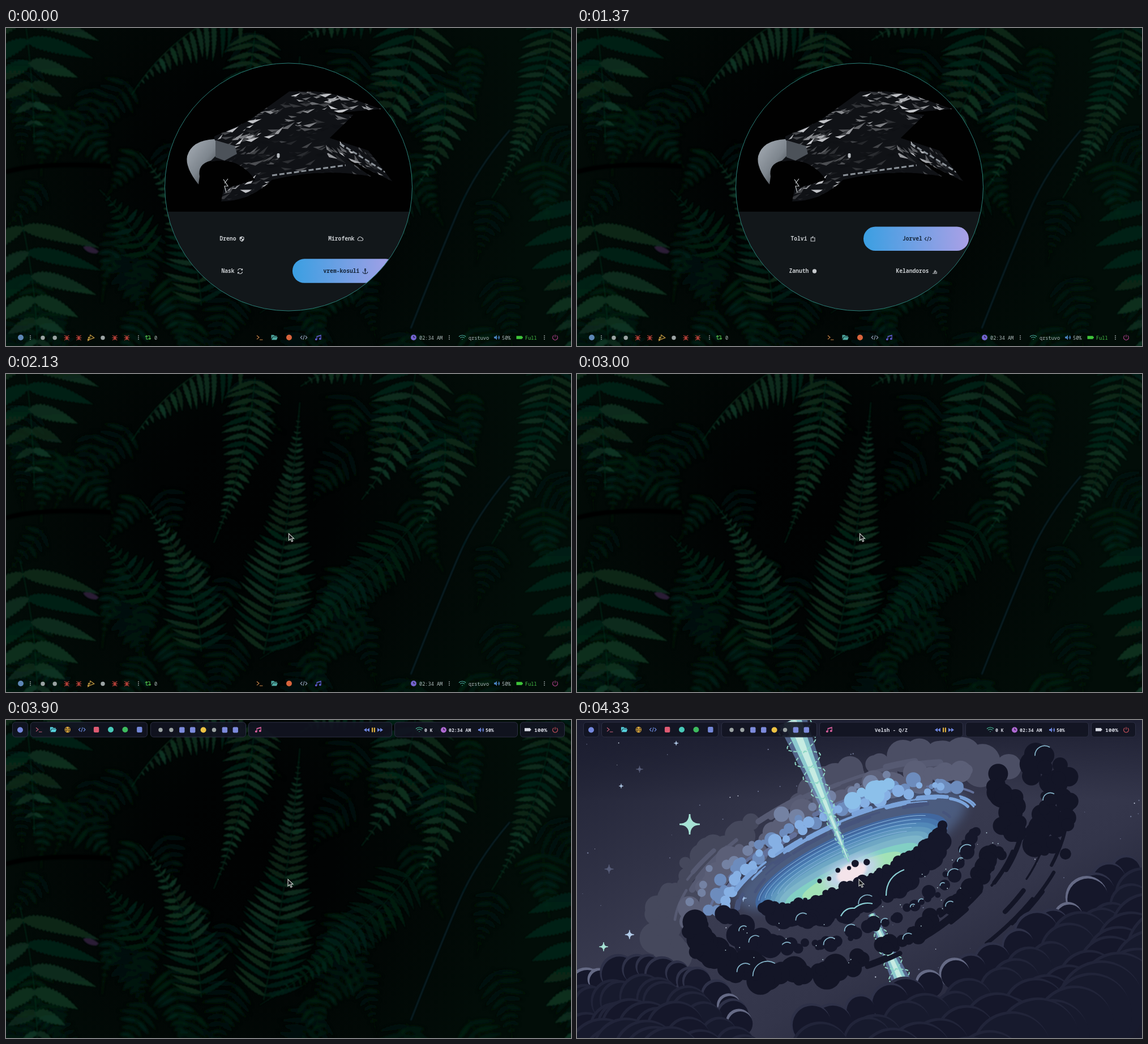
These frames come from a looping animation (998 by 561 pixels, 4730 ms). An HTML page:

```html
<!DOCTYPE html>
<html lang="en">
<head>
<meta charset="utf-8">
<title>Desktop themes</title>
<style>
html,body{margin:0;width:100%;height:100%;overflow:hidden;background:#010504}
svg{display:block;width:998px;height:561px}
text{font-family:"Noto Sans Mono",monospace;white-space:pre}
</style>
</head>
<body>
<svg id="stage" viewBox="0 0 998 561" xmlns="http://www.w3.org/2000/svg"></svg>
<script>
const LOOP = 4730, stage = document.getElementById('stage');
let seed = 7, defs = '', ids = 0;
const rnd = () => (seed = (seed * 16807) % 2147483647) / 2147483647;
const vary = k => (rnd() - .5) * k;
const f = v => v.toFixed(1);
const pts = a => a.map(p => f(p[0]) + ' ' + f(p[1])).join('L');
const loop = (n, fn) => Array.from({length: n}, (_, i) => fn(i));
const many = (n, fn) => loop(n, fn).join('');
const path = (d, fill, extra = '') => `<path d="${d}" fill="${fill}" ${extra}/>`;
const line = (d, c, w = 1, extra = '') => path(d, 'none', `stroke="${c}" stroke-width="${w}" ${extra}`);
const dot = (x, y, r, c) => `<circle cx="${f(x)}" cy="${f(y)}" r="${f(r)}" fill="${c}"/>`;
const box = (x, y, w, h, c, r = 0, extra = '') => `<rect x="${x}" y="${y}" width="${w}" height="${h}" rx="${r}" fill="${c}" ${extra}/>`;
const text = (x, y, s, c, size, extra = '') => `<text x="${x}" y="${y}" fill="${c}" font-size="${size}" ${extra}>${s}</text>`;
const group = (s, attr = '') => `<g ${attr}>${s}</g>`;
// point and heading on a quadratic curve
function curve(x0, y0, cx, cy, x1, y1, u) {
  const v = 1 - u;
  return [v * v * x0 + 2 * u * v * cx + u * u * x1, v * v * y0 + 2 * u * v * cy + u * u * y1,
    Math.atan2(v * (cy - y0) + u * (y1 - cy), v * (cx - x0) + u * (x1 - cx))];
}

// --- icons: [path, filled]
const ICONS = {
  term: ['M-5-3.5l4 3.3-4 3.3M0 4h5.5'],
  folder: ['M-5.5-4.5h4.5l1.5 1.5H4.5v1.5H-3L-5.5 3zM-2.5-.8H6L4 4.3H-5z', 1],
  code: ['M-2.8-3l-3 3 3 3M2.8-3l3 3-3 3M1-4L-1 4'],
  music: ['M-3.5 1.8a2 1.7 0 1 0 1.3 1.6V-1L3.6-2.6V.8a2 1.7 0 1 0 1.2 1.6V-5L-3.5-2.6z', 1],
  wifi: ['M-6-1.5a8.5 8.5 0 0 1 12 0M-3.8.8a5.3 5.3 0 0 1 7.6 0M-.6 3.4h1.2'],
  volume: ['M-5-1.6h2.2L0-4.2v8.4L-2.8 1.6H-5zM1.4-1.8a2.4 2.4 0 0 1 0 3.6zM3-4a5 5 0 0 1 0 8z', 1],
  battery: ['M-5.5-2.8h10v1.6h1.4v2.4H4.5v1.6h-10z', 1],
  power: ['M-2.4-3.6a4.4 4.4 0 1 0 4.8 0M0-5v4.5'],
  bug: ['M0-4V4M-1.2-2V3M1.2-2V3M-4-4.4l2.5 2.4M4-4.4L1.5-2M-4.8 0H4.8M-4 4.4L-1.5 2M4 4.4L1.5 2'],
  swap: ['M-5-1l2-2.4 2 2.4M-3-3.2V3H1M5 1L3 3.4 1 1M3 3.2V-3H-1'],
  bell: ['M-5 5l1-6 2 2L-1-5 6 0-2 3zM-6 3h3'],
  globe: ['M-4.6 0a4.6 4.6 0 1 0 9.2 0a4.6 4.6 0 1 0-9.2 0H4.6M0-4.6V4.6M0-4.6q-4.4 4.6 0 9.2q4.4-4.6 0-9.2'],
  shield: ['M0-4.5L4-3V0Q4 3 0 5Q-4 3-4 0V-3zM0-3.2V0H-2.8Q-2.5 2.4 0 3.6V0H2.8V-2.2z', 1],
  cloud: ['M-3 3a2.2 2.2 0 0 1-.4-4.2 3 3 0 0 1 5.6-.7A2.5 2.5 0 0 1 3 3z'],
  refresh: ['M-4-1a4 4 0 0 1 7.5-1.4M4-4.5v2.4H1.6M4 1A4 4 0 0 1-3.5 2.4M-4 4.5V2.1h2.4'],
  anchor: ['M0-2.4V4.4M-2-1H2M-4.4 1Q-4 4.4 0 4.4Q4 4.4 4.4 1M-1-3.4a1 1 0 1 0 2 0a1 1 0 1 0-2 0'],
  bag: ['M-3.4-2H3.4V4H-3.4zM-1.2-2q0-2.4 2.6-2'],
  stack: ['M-3.6 4H3.6V.5M-1.6 2.2H1.8M-1 .4L2 .9M.2-1.6L2.6.2'],
  prev: ['M0-3.5V3.5L-5 0zM5-3.5V3.5L0 0z', 1],
  next: ['M0-3.5V3.5L5 0zM-5-3.5V3.5L0 0z', 1],
  pause: ['M-3-4h2.2v8H-3zM.8-4H3v8H.8z', 1]
};
function icon(name, x, y, c) {
  if (name === 'disc') return dot(x, y, 5, c);
  if (name === 'dot') return dot(x, y, 3.7, c);
  if (name === 'square') return box(x - 4.7, y - 5, 9.4, 10, c, 2);
  if (name === 'clock') return dot(x, y, 5, c) + line(`M${x} ${y - 3}v3h2.4`, '#11131c');
  if (name === 'more') return [-3, 0, 3].map(d => dot(x, y + d, .9, c)).join('');
  const [d, solid] = ICONS[name], at = `transform="translate(${f(x)} ${y})"`;
  return solid ? path(d, c, at + ' fill-rule="evenodd"') : line(d, c, 1.1, at);
}
// evenly spaced icons written as "name colour"
const row = (x, step, y, list) => list.map((s, i) => icon(s.split(' ')[0], x + i * step, y, s.split(' ')[1])).join('');

// --- fern wallpaper
const GREENS = ['#03110a', '#051a0f', '#072517', '#0c3524', '#164c3c'];
function leaf(x, y, a, len, h, side) {
  const m = Math.max(3, Math.round(len / 7)), up = [], low = [];
  const ca = Math.cos(a), sa = Math.sin(a);
  for (let j = 0; j <= 2 * m; j++) {
    const s = j / (2 * m), w = h * 2.5 * Math.sqrt(s) * (1 - s) * (j % 2 ? 1 : .75), lean = -side * .13 * len * s * s;
    const at = n => [x + ca * len * s - sa * n, y + sa * len * s + ca * n];
    up.push(at(lean + w));
    low.unshift(at(lean - w));
  }
  return 'M' + pts(up.concat(low)) + 'z';
}
// base, tip, sideways bend, leaf length, tone, gap between leaves
function fern(x0, y0, x1, y1, bend, w, tone, gap = 13, sides = [-1, 1]) {
  const len = Math.hypot(x1 - x0, y1 - y0), n = Math.round(len / gap), id = 'fern' + ids++;
  const spine = [x0, y0, (x0 + x1) / 2 - (y1 - y0) / len * bend, (y0 + y1) / 2 + (x1 - x0) / len * bend, x1, y1];
  const d = ['', ''];
  defs += `<linearGradient id="${id}" gradientUnits="userSpaceOnUse" x1="${f(x0)}" y1="${f(y0)}" x2="${f(x1)}" y2="${f(y1)}"><stop stop-color="${GREENS[tone - 1]}"/><stop offset="1" stop-color="${GREENS[tone]}"/></linearGradient>`;
  for (let i = 0; i < n; i++) {
    const v = (1 - (i + .5) / n) ** 1.25, [x, y, th] = curve(...spine, 1 - v);
    const size = w * Math.min(1, 1.35 * v ** 1.2) * (.88 + .24 * rnd());
    for (const s of sides) d[rnd() < .5 ? 0 : 1] += leaf(x, y, th + s * (1.28 + vary(.16)), size, Math.min(gap * .42, size * .22), s);
  }
  return path(d[0], `url(#${id})`) + path(d[1], `url(#${id})`, 'opacity=".72"')
    + line(`M${f(x0)} ${f(y0)}Q${spine.slice(2).map(f).join(' ')}`, GREENS[tone], 1.4, 'opacity=".8"');
}
function ferns() {
  const filler = many(70, i => {
    const x = rnd() * 998, y = rnd() * 580, a = Math.PI * (.25 + rnd() * .5), len = 90 + rnd() * 70;
    return Math.hypot(x - 430, y - 200) < 150 ? '' : fern(x, y, x + len * Math.cos(a), y + len * Math.sin(a), vary(50), 30 + rnd() * 25, i % 3 ? 1 : 2);
  });
  const front = fern(30, -40, 50, 200, -8, 135, 3, 36) + fern(25, 330, 55, 620, -20, 150, 3, 36)
    + fern(1015, 290, 1005, 620, 10, 105, 3, 36)
    + fern(420, -40, 222, 118, 45, 75, 3, 13, [-1])
    + fern(250, 405, 165, 285, 14, 50, 2) + fern(715, 270, 448, 503, -30, 55, 2)
    + fern(345, 490, 236, 220, 50, 60, 3) + fern(440, 5, 367, 298, -24, 52, 3)
    + fern(725, -20, 628, 222, -40, 82, 3, 18) + fern(775, 105, 725, 280, -35, 58, 3, 16)
    + fern(968, -20, 858, 300, -40, 56, 3) + fern(650, -45, 520, 22, 8, 55, 3)
    + fern(455, 494, 519, 50, 15, 76, 3)
    + line('M890 180Q830 250 800 320T715 530', '#12405a', 2.4, 'opacity=".45"')
    + line('M0 254Q60 236 185 244', '#010302', 8) + path('M136 386q14-4 28 8l-4 4q-18 0-24-12', '#291f36');
  defs += '<radialGradient id="floor" gradientUnits="userSpaceOnUse" cx="420" cy="240" r="520"><stop stop-color="#010202"/><stop offset=".3" stop-color="#010303"/><stop offset="1" stop-color="#020d08"/></radialGradient>'
    + [['fine', .8], ['soft', 2], ['haze', 9]].map(([id, k]) => `<filter id="${id}"><feGaussianBlur stdDeviation="${k}"/></filter>`).join('');
  return box(0, 0, 998, 561, 'url(#floor)') + group(filler, 'filter="url(#soft)"') + group(front, 'filter="url(#fine)"');
}

// --- galaxy wallpaper, built around one tilted centre
const DARK = '#15172a', DEEP = '#131526';
const orbit = (rx, ry, deg) => {
  const a = deg * Math.PI / 180, x = rx * Math.cos(a), y = ry * Math.sin(a);
  return [485 + x * .914 + y * .407, 255 - x * .407 + y * .914];
};
const sweep = (rx, ry, a0, a1) => loop(41, i => orbit(rx, ry, a0 + (a1 - a0) * i / 40));
const streak = (rx, ry, a0, a1, c, w) => line('M' + pts(sweep(rx, ry, a0, a1)), c, w, 'stroke-linecap="round"');
const streaks = (n, rx, ry, a0, a1, c, w) => many(n, () => {
  const a = a0 + rnd() * (a1 - a0), k = .92 + rnd() * .16;
  return streak(rx * k, ry * k, a, a + 6 + rnd() * 14, c, w * (.5 + rnd()));
});
function puffs(rx, ry, a0, a1, n, r, c, spread = 10, rim = 0) {
  let s = '', rims = '';
  for (let i = 0; i < n; i++) {
    const [px, py] = orbit(rx, ry, a0 + (a1 - a0) * (i + rnd() * .8) / n);
    const x = px + vary(spread), y = py + vary(spread), q = r * (.4 + rnd() * .8);
    s += dot(x, y, q, c);
    if (rnd() < rim) rims += line(`M${f(x - q)} ${f(y)}a${f(q)} ${f(q)} 0 0 1 ${f(q * 1.5)} ${f(-q * .86)}`, '#86b6cb', 1.7, 'stroke-linecap="round"');
  }
  return s + rims;
}
const disc = (dy, rx, ry, c, extra = '') => `<ellipse rx="${rx}" ry="${ry}" fill="${c}" transform="translate(485 ${255 + dy}) rotate(-24)" ${extra}/>`;
const spark = (x, y, r, c) => path(`M${f(x)} ${f(y - r)}q0 ${r} ${r} ${r}q${-r} 0 ${-r} ${r}q0 ${-r} ${-r} ${-r}q${r} 0 ${r} ${-r}`, c, `stroke="${c}" stroke-width="${r / 7}"`);
function jet(x0, y0, x1, y1, w0, w1, turns) {
  const len = Math.hypot(x1 - x0, y1 - y0), nx = -(y1 - y0) / len, ny = (x1 - x0) / len;
  const at = (u, k) => { const w = (w0 + (w1 - w0) * u) * k; return [x0 + (x1 - x0) * u + nx * w, y0 + (y1 - y0) * u + ny * w]; };
  const beam = (k, c) => path('M' + pts([at(0, -k), at(1, -k), at(1, k), at(0, k)]) + 'z', c);
  const coil = sign => line('M' + pts(loop(91, i => at(i / 90, sign * Math.sin(i / 90 * turns * Math.PI)))), '#8fd8c6', 2, 'stroke-dasharray="6 3"');
  return beam(.8, '#7d9fd488') + beam(.5, '#8cc9cf') + beam(.22, '#c6ebe2') + coil(1) + coil(-1);
}
// a bank of clouds: each layer lies further in, with a fainter rim
function bank(x0, y0, cx, cy, x1, y1, n, r, dx, dy) {
  return many(4, k => many(n, i => {
    const [px, py] = curve(x0, y0, cx, cy, x1, y1, (i + rnd() * .7) / n);
    const x = px + dx * k + vary(14), y = py + dy * k + vary(14), q = r * (.7 + rnd() * .5 + k * .4);
    const rim = k ? '#212439' : rnd() < .45 ? '#656a85' : '#2e3148';
    return dot(x, y, q, rim) + dot(x + 2.5, y + 3.5, q - 1, k % 2 ? '#171a2d' : DARK);
  }));
}
function galaxy() {
  defs += '<linearGradient id="sky" x2="1" y2="1"><stop stop-color="#1e2032"/><stop offset=".42" stop-color="#393b50"/><stop offset=".65" stop-color="#33354a"/><stop offset="1" stop-color="#16182a"/></linearGradient>'
    + '<linearGradient id="dusk" x2="0" y2="1"><stop stop-color="#1a1c2e" stop-opacity=".9"/><stop offset=".25" stop-color="#1a1c2e" stop-opacity="0"/></linearGradient>';
  let s = box(0, 0, 998, 561, 'url(#sky)') + box(0, 0, 998, 561, 'url(#dusk)');
  s += many(110, () => dot(rnd() * 998, 35 + rnd() * 500, .5 + rnd() * .8, rnd() < .7 ? '#69708d' : '#cfd8e8'));
  s += many(9, i => spark(rnd() * 320, 40 + rnd() * 500, 4 + i % 3 * 2, i % 2 ? '#565c78' : '#b3cdea'));
  s += spark(199, 184, 18, '#a6e3d5') + spark(356, 196, 11, '#b3cdea') + spark(47, 400, 8, '#a6e3d5');
  // far side
  s += puffs(360, 150, 170, 250, 40, 25, '#45485c', 34) + puffs(330, 140, 262, 340, 34, 28, '#4b4e64', 34)
    + streaks(14, 335, 145, 175, 330, '#565a72', 8)
    + puffs(300, 118, 195, 325, 46, 20, '#5b5f77', 28) + puffs(310, 125, 200, 300, 16, 12, '#7482a3', 26)
    + disc(-25, 220, 62, '#6f9bd8', 'filter="url(#haze)" opacity=".35"') + streaks(16, 265, 100, 190, 335, '#63719a', 6)
    + puffs(262, 104, 188, 335, 40, 11, '#6d8cbd', 22) + puffs(248, 94, 190, 325, 34, 10, '#86b0e4', 18)
    + puffs(268, 108, 282, 296, 9, 14, '#8cc0ea', 18) + streaks(18, 228, 78, 185, 345, '#7ba4db', 6)
    + streaks(16, 205, 68, 185, 350, '#46547c', 5);
  // glowing disc
  s += many(6, i => disc(i * 2, 184 - i * 9, 56 - i * 6, `hsl(${216 - i * 4} 42% ${44 + i * 4}%)`));
  s += many(5, i => streak(178 - i * 12, 52 - i * 6, 190, 330, '#8cb9e0', 1))
    + disc(18, 128, 23, '#82cfc4') + disc(19, 95, 17, '#a2e2b6')
    + disc(14, 52, 24, '#c5d2f0', 'filter="url(#haze)" opacity=".9"')
    + path('M482 256L440 150 410 90 455 190z', '#7fa8e0', 'filter="url(#haze)"') + jet(480, 250, 380, 0, 2, 32, 9)
    + disc(14, 28, 15, '#f4e4ea', 'filter="url(#soft)"');
  // near side
  s += path('M' + pts(sweep(178, 30, 0, 180).concat(sweep(174, 78, 180, 0))) + 'z', DARK)
    + puffs(176, 34, 2, 178, 60, 9, DARK, 8) + puffs(168, 76, 8, 172, 48, 15, DARK, 14, .06)
    + many(6, i => dot(430 + i * 16 + vary(6), 283 - i * 7 + vary(10), 3 + rnd() * 5, DARK))
    + line('M466 346q8-16 24-14q14-12 32-8M546 310q0-34 32-46', '#8bd0d5', 2.2)
    + jet(520, 342, 585, 488, 8, 23, 6)
    + puffs(228, 118, 15, 168, 50, 11, DARK, 16, .2) + puffs(235, 128, 148, 186, 16, 18, DARK, 24, .2)
    + puffs(300, 166, 100, 186, 42, 23, DEEP, 28, .05) + puffs(285, 156, 28, 92, 42, 15, DEEP, 24, .06) + puffs(300, 150, -10, 24, 20, 18, DEEP, 34, .06)
    + streaks(12, 300, 172, 20, 110, DEEP, 6) + streaks(7, 390, 230, 20, 50, DEEP, 6)
    + puffs(385, 215, -8, 36, 36, 19, DEEP, 56, .04)
    + many(30, () => dot(...orbit(170 + rnd() * 130, 75 + rnd() * 90, 15 + rnd() * 150), .9, '#b9d5de'));
  return s + bank(10, 465, 190, 385, 310, 560, 13, 27, -10, 50) + bank(970, 255, 790, 440, 380, 550, 17, 33, 34, 46);
}

// --- launcher
const ITEMS = ['Dreno shield', 'Mirofenk cloud', 'Nask refresh', 'vrem-kosuli anchor',
  'Tolvi bag', 'Jorvel code', 'Zanuth dot', 'Kelandoros stack'].map(s => s.split(' '));
function bird() {
  const beak = 'M340 276Q316 246 320 226Q328 198 368 196L380 216 362 234Q338 240 342 262z';
  const body = 'M362 236L368 191 428 164 500 112 548 112 598 120 663 143 580 150 614 153 572 194 640 216 683 271 600 230 645 262Q560 246 470 268Q430 306 380 306L384 284 440 268Q410 226 362 236z';
  defs += `<clipPath id="bird"><path d="${body}"/></clipPath><linearGradient id="beak" x2="1" y2="1"><stop stop-color="#a9b0b8"/><stop offset=".5" stop-color="#7d858d"/><stop offset="1" stop-color="#1d2024"/></linearGradient>`;
  // plates follow the head, bright along the crest and the feather edges
  const plates = many(480, () => {
    const x = 365 + rnd() * 315, y = 108 + rnd() * 195, wing = y > 190 && x > 560;
    const a = (wing ? .65 : -.45 + (x - 370) / 420) + vary(.8), len = 7 + rnd() * 22;
    const crest = y < 232 - (x - 340) * .32 || (y < 150 && x > 480);
    const v = Math.round(14 + 195 * rnd() ** (crest ? 1.2 : 2.6) * (crest || wing || y > 245 ? 1 : .4));
    const at = (k, da) => [x + len * k * Math.cos(a + da), y + len * k * Math.sin(a + da)];
    return path('M' + pts([[x, y], at(1, 0), at(.45, .5)]) + 'z', `rgb(${v},${v + 2},${v + 6})`);
  });
  return group(path(body, '#101216') + plates + line('M590 204l80 50M470 260l130-18', '#8b9299', 3, 'stroke-dasharray="9 4"'), 'clip-path="url(#bird)"')
    + path(beak, 'url(#beak)') + path('M370 198l34 10 4 14-22 12-16-6z', '#4c5259')
    + line('M384 267l8 12h-6l3 11M386 274l6-8', '#c5c9cc', 1.2) + box(478.5, 221, 5, 8, '#b9bdc2', 2);
}
function launcher() {
  defs += '<clipPath id="round"><circle cx="499" cy="280.5" r="218.5"/></clipPath><linearGradient id="glow"><stop stop-color="#3a9fe2"/><stop offset="1" stop-color="#aaa0e6"/></linearGradient>';
  const items = ITEMS.map(([name, ic], i) => {
    const w = name.length * 5.82, x = (i % 2 ? 600 : 399.5) - (w + 15) / 2, y = i % 4 < 2 ? 372 : 429;
    return group(text(f(x), y + 3.4, name, 'currentColor', 9.7, 'font-weight="600"') + icon(ic, x + w + 10, y, 'currentColor'), `id="item${i}"`);
  }).join('');
  return group(box(280, 60, 440, 264, '#010101') + box(280, 324, 440, 180, '#12171a') + bird()
    + box(0, 0, 186, 42.5, 'url(#glow)', 21, 'id="pill"') + items, 'clip-path="url(#round)"')
    + '<circle cx="499" cy="280.5" r="218.5" fill="none" stroke="#2b7f78"/>';
}

// --- panels
const label = (x, s, c = '#b0bcbc') => text(x, 549.5, s, c, 8.6);
const bold = (x, s, size = 8.2) => text(x, 20.5, s, '#d5d8e2', size, 'font-weight="700"');
const one = (x, s, y = 546) => row(x, 0, y, [s]);
const GREY = 'dot #9ba3a3', BUG = 'bug #c2443c', GHOST = 'square #7d8bdc', MORE = 'more #9aa3a5';
const LOWER = [
  [2470, one(26, 'disc #5d86b5') + one(43, MORE) + row(65, 21.2, 546.5, [GREY, GREY, BUG, BUG, 'bell #d3a545', GREY, BUG, BUG])
    + one(234, MORE) + one(251, 'swap #4fc04c') + label(262, '0')],
  [2590, row(448, 26, 546, ['term #d08a4b', 'folder #4ea7a0', 'disc #d8643c', 'code #8f9bb0', 'music #5a57c4'])],
  [3000, one(720, 'clock #7464cf') + label(730, '02:34 AM') + one(783, MORE) + one(806, 'wifi #4fb7a8') + label(817, 'qrstuvo')
    + one(867, 'volume #4a86c4') + label(876, '50%') + one(907, 'battery #3fc53a') + label(917, 'Full', '#45bd45')
    + one(951, MORE) + one(970, 'power #b0408c')]
];
const UPPER = [
  [11, 39, one(25, 'disc #7387dc', 17.5)],
  [43, 250, row(58, 25.4, 17, ['term #d2647d', 'folder #56d0dc', 'globe #dfa93a', 'code #6d8ce0', 'square #de5a72', 'disc #48c9b8', 'disc #3dbb5e', 'square #7387d8'])],
  [255, 424, row(273, 18.9, 17.5, [GREY, GREY, GHOST, GHOST, 'disc #edc243', GREY, GHOST, GHOST])],
  [428, 682, one(446, 'music #d65f9c', 17) + row(637, 12, 17.5, ['prev #6e86dd', 'pause #e0b03e', 'next #6e86dd'])],
  [686, 904, one(730, 'wifi #4cc9a0', 17) + bold(739, '0 K') + one(773, 'clock #b06ad4', 17.5) + bold(782, '02:34 AM') + one(839, 'volume #6e86dd', 17.5) + bold(847, '50%')],
  [908, 987, one(921.5, 'battery #d5d8e2', 17) + bold(933, '100%', 9.6) + one(970, 'power #d4565f', 17.5)]
];

const scene = ferns() + group(galaxy(), 'id="galaxy"')
  + LOWER.map((p, i) => group(p[1], `id="lower${i}"`)).join('')
  + UPPER.map(([x0, x1, s], i) => group(box(x0 + .5, 4, x1 - x0 - 1, 26, '#121422', 5, 'fill-opacity=".9" stroke="#2c2f43"') + s, `id="upper${i}"`)).join('')
  + group(bold(526, 'Velsh - Q/Z', 8.8), 'id="song"')
  + group(launcher(), 'id="menu"')
  + path('M0 0V12L3 9.4 5.2 14.2 7.2 13.2 5.2 8.7H9z', '#16181a', 'id="cursor" stroke="#d4d8d4" stroke-width="1.1"');
stage.innerHTML = `<defs>${defs}</defs>${scene}`;

const $ = id => document.getElementById(id);
const show = (id, on) => $(id).style.display = on ? '' : 'none';

// [until, page, slot]
const STEPS = [[280, 0, 3], [770, 0, 2], [890, 1, 2], [1270, 1, 3], [LOOP, 1, 1]];

function draw(t) {
  const [, page, slot] = STEPS.find(s => t < s[0]);
  const fade = Math.min(1, Math.max(0, (t - 1530) / 240));
  show('menu', fade < 1);
  $('menu').style.opacity = 1 - fade;
  $('pill').setAttribute('x', slot % 2 ? 506 : 306);
  $('pill').setAttribute('y', slot < 2 ? 350.5 : 407.3);
  ITEMS.forEach((_, i) => {
    show('item' + i, i >> 2 === page);
    $('item' + i).style.color = i === page * 4 + slot ? '#16263a' : '#c6cacd';
  });
  LOWER.forEach((p, i) => show('lower' + i, t < p[0]));
  UPPER.forEach((_, i) => show('upper' + i, t >= (i ? 3630 + 45 * i : 3510)));
  show('galaxy', t >= 4100);
  show('song', t >= 4200);
  show('cursor', t >= 1530);
  $('cursor').setAttribute('transform', t < 3470 ? 'translate(499.5 281.5)' : 'translate(498 281)');
}
const start = performance.now();
function tick() {
  draw((performance.now() - start) % LOOP);
  requestAnimationFrame(tick);
}
tick();
</script>
</body>
</html>
```
